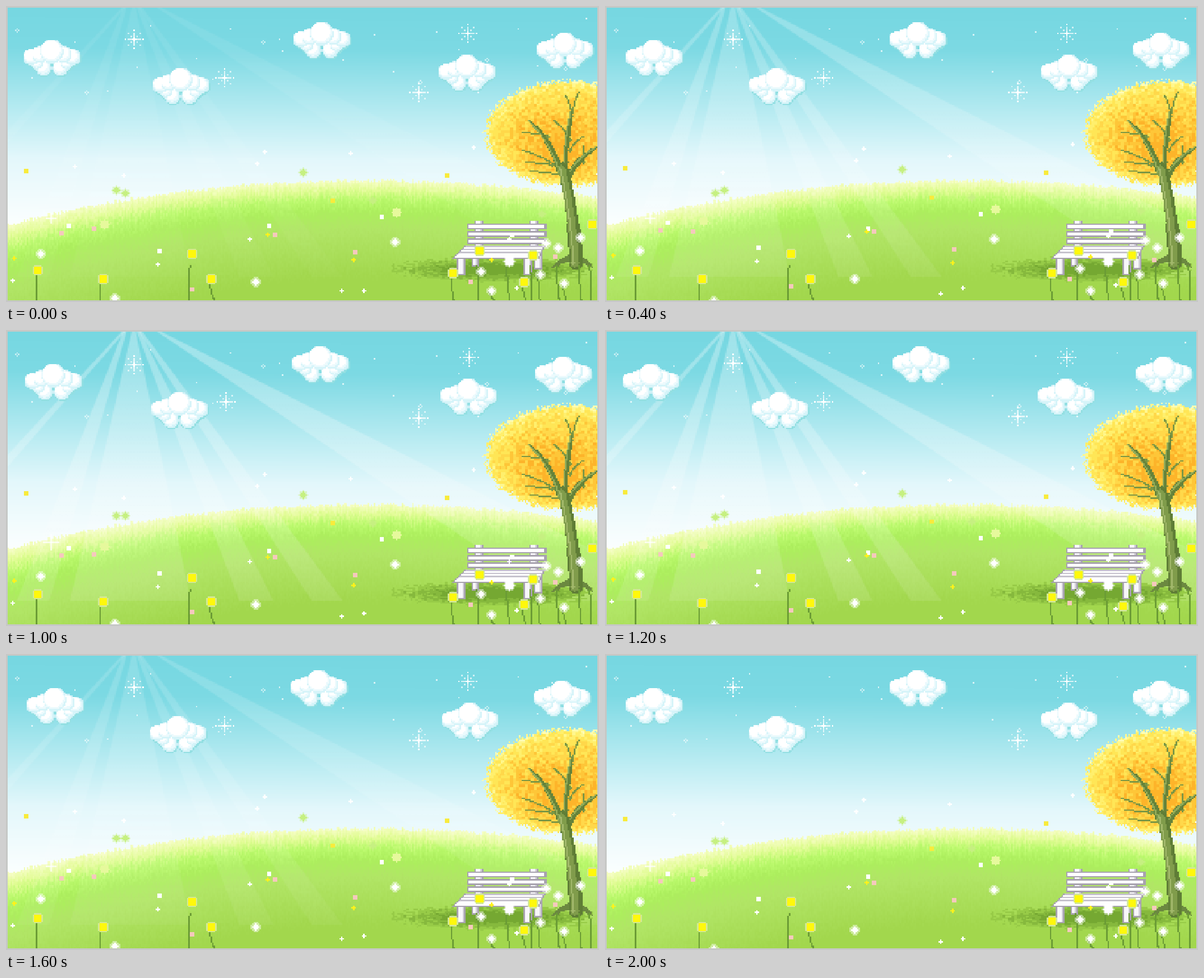
An HTML page with a canvas for the animation above (2.2 s loop, 1058x529 px).

```html
<!DOCTYPE html>
<html lang="en">
<head>
<meta charset="utf-8">
<title>Meadow</title>
<style>
  html, body { margin: 0; width: 100%; height: 100%; overflow: hidden; }
  canvas { display: block; width: 100vw; height: 100vh; image-rendering: pixelated; }
</style>
</head>
<body>
<canvas id="stage" width="400" height="200"></canvas>
<script>
const W = 400, H = 200, CELL = 2.645, STEP = 200, STEPS = 11;
const stage = document.getElementById('stage').getContext('2d');

// Stage coordinates to pixel-art cells
const cell = v => Math.round(v / CELL - 0.5);
const mix = (a, b, k) => a + (b - a) * k;
const tri = (n, period) => period / 2 - Math.abs(n % period - period / 2);
const hash = (x, y) => {
  const s = Math.sin(x * 127.1 + y * 311.7) * 43758.5453;
  return s - Math.floor(s);
};

function layer(w, h, paint) {
  const canvas = document.createElement('canvas');
  canvas.width = w;
  canvas.height = h;
  paint(canvas.getContext('2d'));
  return canvas;
}

function box(c, x, y, w, h, color) {
  c.fillStyle = color;
  c.fillRect(x, y, w, h);
}

function disc(c, x, y, r, color) {
  for (let py = Math.ceil(y - r); py <= y + r; py++) {
    const half = Math.sqrt(r * r - (py - y) ** 2);
    const left = Math.ceil(x - half);
    box(c, left, py, Math.floor(x + half) - left + 1, 1, color);
  }
}

function plus(c, x, y, arm, color) {
  box(c, x - arm, y, arm * 2 + 1, 1, color);
  box(c, x, y - arm, 1, arm * 2 + 1, color);
}

// Tapering limb that leaves its root upright, then bends towards the tip
function limb(c, [x0, y0, x1, y1], r0, r1, color, shift = 0) {
  const bx = mix(x0, x1, 0.3), by = mix(y0, y1, 0.6);
  const n = Math.ceil(Math.hypot(x1 - x0, y1 - y0) / 2);
  for (let i = 0; i <= n; i++) {
    const k = i / n, r = mix(r0, r1, k);
    const x = cell(mix(mix(x0, bx, k), mix(bx, x1, k), k)) + shift;
    const y = cell(mix(mix(y0, by, k), mix(by, y1, k), k));
    if (r < 1) box(c, x, y, 1, 1, color);
    else disc(c, x, y, r, color);
  }
}

// Stops are [position, red, green, blue]
function ramp(stops, t) {
  let i = 0;
  while (i < stops.length - 2 && t > stops[i + 1][0]) i++;
  const [a, ...from] = stops[i], [b, ...to] = stops[i + 1];
  const k = Math.max(0, Math.min(1, (t - a) / (b - a)));
  return `rgb(${from.map((v, j) => Math.round(mix(v, to[j], k)))})`;
}

const SKY = [[0, 118, 215, 225], [27, 124, 217, 227], [75, 190, 237, 243],
  [102, 227, 247, 251], [145, 250, 254, 254]];
const HILL = [[0, 245, 253, 195], [6, 226, 252, 150], [13, 186, 249, 108],
  [21, 172, 238, 93], [33, 177, 229, 102], [65, 162, 215, 77]];
const ridge = x => 117.5 + 30 * (Math.abs(x - 245) / 245) ** 2.1;

const meadow = layer(W, H, c => {
  for (let x = 0; x < W; x++) {
    const top = ridge(x) + hash(x, 1) * 2.4 - 1;
    const stretch = mix(0.78, 1, Math.min(1, x / 200));
    for (let y = 0; y < H; y++) {
      const depth = y - top;
      const blade = (hash(x, y >> 1) - 0.5) * Math.min(6, 3 + depth * 0.1);
      box(c, x, y, 1, 1, depth < 0 ? ramp(SKY, y - x * 0.01) : ramp(HILL, depth * stretch + blade));
    }
  }
});

function paintShadow(c) {
  for (let y = 169; y < 188; y++) for (let x = 260; x < 396; x++) {
    const d = Math.hypot((x - 330) / 66, (y - 177.5) / 8) + (hash(x >> 1, y) - 0.5) * 0.35;
    if (d < 1) box(c, x, y, 1, 1, d < 0.55 ? '#75a832' : d < 0.8 ? '#86b93d' : '#97cb47');
  }
}

const LEAVES = ['#fdb42a', '#fec638', '#ffd84a', '#ffe656', '#ffef6c', '#fff78e', '#fffcb4'];

function paintLeaves(c) {
  for (let y = 48; y < 124; y++) for (let x = 320; x < W; x++) {
    const rim = Math.hypot((x - 380) / 57, (y - 85.5) / 35.5);
    if (rim + (hash(x, y) - 0.5) * 0.1 > 1) continue;
    const core = Math.hypot((x - 374) / 46, (y - 96) / 34);
    const tone = core * 2.4 + rim ** 6 * 2.2 + (hash(x >> 1, y >> 1) - 0.5) * 2.6 + 0.3;
    box(c, x, y, 1, 1, LEAVES[Math.max(0, Math.min(6, Math.floor(tone)))]);
  }
}

const BOUGHS = [[990, 298, 936, 206], [996, 295, 1010, 190], [1003, 305, 1055, 252]];
const TWIGS = [[968, 233, 922, 226], [988, 292, 922, 258], [975, 284, 926, 279],
  [990, 302, 935, 295], [1010, 196, 999, 160], [1010, 196, 1022, 154],
  [1006, 240, 977, 204], [1006, 258, 1030, 234], [1030, 278, 1030, 249]];
const TRUNK = [1018, 458, 994, 290];

function paintTree(c) {
  for (const t of TWIGS) limb(c, t, 1, 0.5, '#7b9744');
  for (const b of BOUGHS) {
    limb(c, b, 2.2, 0.8, '#66833a');
    limb(c, b, 1, 0.5, '#93ac58', -1);
  }
  for (const x of [975, 1046]) limb(c, [x, 468, 1014, 448], 0.5, 2.4, '#6b8840');
  limb(c, TRUNK, 4.6, 3, '#5f7d36');
  limb(c, TRUNK, 3, 2, '#809c4b', -1);
  limb(c, TRUNK, 1, 0.5, '#a3b96c', -2);
}

function paintBench(c) {
  const edge = '#a7a2ae', shade = '#d3d0da';
  const post = (x, y, w, h) => {
    box(c, x, y, w, h, edge);
    box(c, x + 1, y, w - 2, h - 1, shade);
    box(c, x + 1, y, w >> 1, h - 1, '#f8f7fa');
  };
  post(314, 169, 5, 7);
  post(356, 167, 6, 11);
  for (const x of [316, 353]) post(x, 145, 6, 19);
  for (let y = 147; y < 160; y += 5) {
    box(c, 311, y, 54, 4, edge);
    box(c, 312, y + 1, 51, 2, '#fff');
  }
  for (let i = 0; i < 9; i++) {
    box(c, 309 - i, 162 + i, 55 + (i >> 1), 1, edge);
    if (i < 8) box(c, 310 - i, 162 + i, 53 + (i >> 1), 1, i % 2 || i > 5 ? '#fff' : '#c6c2cd');
  }
  for (const x of [304, 349]) post(x, 171, 6, 11);
}

const YELLOW = [[57, 472], [173, 488], [332, 443], [366, 488], [797, 478],
  [845, 437], [924, 493], [940, 446], [1046, 390]];
const WHITE = [[897, 456], [986, 433], [1026, 415], [953, 480], [997, 497], [865, 508]];

const scenery = layer(W, H, c => {
  paintShadow(c);
  paintLeaves(c);
  paintTree(c);
  paintBench(c);
  for (const [x, y] of [...YELLOW, ...WHITE])
    limb(c, [x - 4, Math.max(y, 465), x + (hash(x, y) - 0.5) * 12, 526], 0.5, 0.5, '#6b9c35');
});

// Mirrored puffs: distance from the middle, height, radius
const PUFFS = [[5.8, 19.3, 5.4], [10, 16, 4.6], [13.8, 12, 5.6], [8, 10.5, 5.8], [0, 8.4, 8.2]];
const cloud = layer(42, 30, c => {
  const coat = (color, dx, dy, grow) => {
    for (const [off, y, r] of PUFFS)
      for (const side of [-1, 1]) disc(c, 19.5 + off * side + dx, y + dy, r + grow, color);
  };
  coat('#93dfe2', 0.4, 0.7, 0.2);
  coat('#cdf0f6', 0, 0, 0);
  for (const [off, y, r] of PUFFS) for (const side of [-1, 1]) {
    const x = 19.5 + off * side;
    disc(c, x, y, r - 0.4, '#d6f4f9');
    disc(c, x - 0.5, y - 0.7, r - 0.9, '#ecfafd');
    disc(c, x - 0.9, y - 1.4, r - 1.7, '#ffffff');
  }
});
// left, top, drift direction
const CLOUDS = [[11, 22, 1], [98, 41, -1], [193, 10, -1], [291, 32, 1], [357, 17, -1]];

// x at the top edge and the two sideways slopes of each beam
const BEAMS = [[212, -0.93, -0.86], [213, -0.4, -0.28], [228, -0.235, 0.21],
  [235, 0.375, 0.5], [238, 0.635, 0.75], [268, 1.48, 1.98]];
const rays = layer(W, H, c => {
  const fade = c.createLinearGradient(0, 0, 0, 183);
  fade.addColorStop(0, 'rgba(255,255,255,.32)');
  fade.addColorStop(1, 'rgba(255,255,255,.1)');
  c.fillStyle = fade;
  for (const [x, a, b] of BEAMS) {
    c.beginPath();
    c.moveTo((x - 3) / CELL, 0);
    c.lineTo((x + 3) / CELL, 0);
    c.lineTo(x / CELL + b * 183, 183);
    c.lineTo(x / CELL + a * 183, 183);
    c.fill();
  }
});

const SIDES = [[1, 0], [0, 1], [-1, 0], [0, -1]];

const twinkles = layer(W, H, c => {
  for (let i = 0; i < 30; i++) {
    const x = Math.floor((i + hash(i, 3)) * W / 30), y = Math.floor(4 + hash(i, 7) * 55);
    if (i % 4) box(c, x, y, 1, 1, 'rgba(255,255,255,.7)');
    else for (const [u, v] of SIDES) box(c, x + u, y + v, 1, 1, 'rgba(255,255,255,.55)');
  }
});

function star(c, x, y) {
  plus(c, x, y, 4, 'rgba(255,255,255,.7)');
  disc(c, x, y, 1, '#fff');
  for (const [u, v] of SIDES) {
    box(c, x + u * 6, y + v * 6, 1, 1, '#fff');
    for (const k of [2, 4])
      box(c, x + (u - v) * k, y + (u + v) * k, 1, 1, 'rgba(255,255,255,.65)');
  }
}
const STARS = [[228, 59], [390, 128], [736, 154], [823, 48]];

function bloom(c, x, y, r, core, halo) {
  if (halo) disc(c, x, y, r + 1, halo);
  disc(c, x, y, r, core);
}

// Scattered petals: how many, radius, highest and lowest row, colours
const KINDS = [
  { count: 7, r: 1, from: 95, to: 118, core: '#fff' },
  { count: 7, r: 1, from: 156, to: 196, core: '#fff' },
  { count: 5, r: 1.5, from: 132, to: 173, core: '#fff' },
  { count: 6, r: 2.2, from: 157, to: 198, core: '#fff', halo: 'rgba(255,255,255,.45)' },
  { count: 5, r: 2, from: 111, to: 143, core: '#c6f081', halo: 'rgba(198,240,129,.4)' },
  { count: 2, r: 3, from: 138, to: 148, core: '#e6f99c' },
  { count: 3, r: 1.5, from: 111, to: 133, core: '#f8eb3c' },
  { count: 4, r: 1, from: 143, to: 187, core: '#fff21a' },
  { count: 7, r: 1.5, from: 145, to: 200, core: '#f5c9bd' }
];
const petals = KINDS.flatMap((kind, k) => Array.from({ length: kind.count }, (_, i) => ({
  ...kind,
  x: Math.floor((i + hash(i, k + 20)) * W / kind.count),
  y: Math.floor(mix(kind.from, kind.to, hash(k, i + 40))),
  sinks: (i + k) % 5 === 4
})));

function draw(step) {
  const c = stage, odd = step % 2;
  const drift = tri(step, 6);
  const sink = tri(step, 4);
  const rise = Math.min(sink + (step > 7 ? 2 : 0), STEPS - 1 - step);

  c.drawImage(meadow, 0, 0);
  c.globalAlpha = Math.min(1, (step + 1) / 4, (10 - step) / 4);
  c.drawImage(rays, 0, 0);
  c.globalAlpha = 1;
  c.drawImage(scenery, 0, 0);
  c.drawImage(twinkles, 0, 0);
  for (const [x, y, dir] of CLOUDS) c.drawImage(cloud, x + dir * drift, y);
  STARS.forEach(([x, y], i) => star(c, cell(x) + odd * (i % 2), cell(y) + odd * (1 - i % 2)));
  plus(c, cell(80), cell(380), odd ? 5 : 3, 'rgba(255,255,255,.7)');

  YELLOW.forEach(([x, y]) =>
    bloom(c, cell(x), cell(y) - (y > 485 ? odd : 0), 2.9, '#fff80c', '#d3e894'));
  WHITE.forEach(([x, y], i) =>
    bloom(c, cell(x), cell(y), i ? 2.2 : 3, '#fff', 'rgba(255,255,255,.45)'));
  for (const p of petals)
    bloom(c, p.x, p.y + (p.sinks ? sink : -rise), p.r, p.core, p.halo);

  c.strokeStyle = '#c6c8c6';
  c.strokeRect(0.5, 0.5, W - 1, H - 1);
}

function tick() {
  draw(Math.floor(performance.now() / STEP) % STEPS);
  requestAnimationFrame(tick);
}
tick();
</script>
</body>
</html>
```
